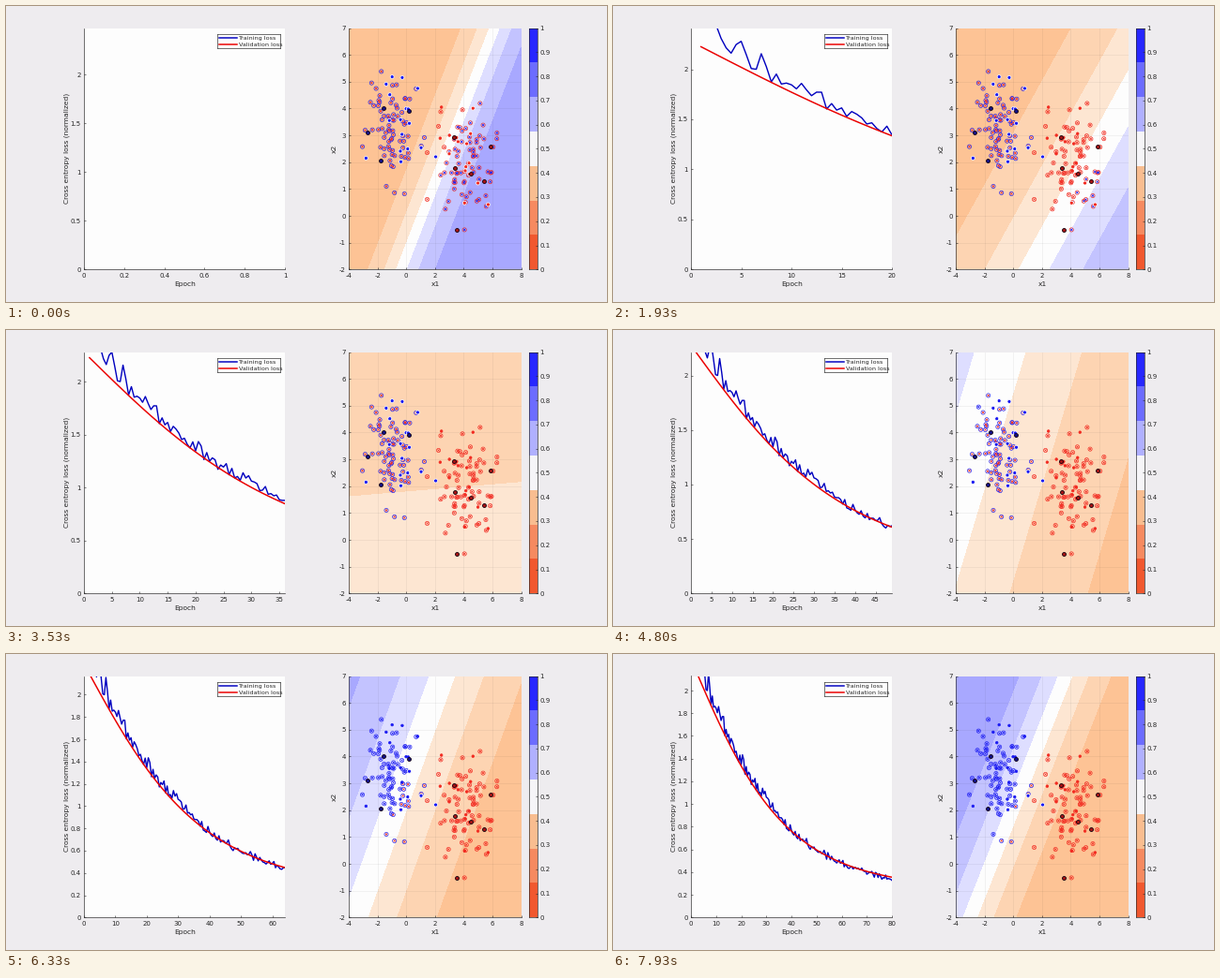
Animation of 640x316 px, one loop 8000 ms. Source, as a matplotlib script:

```python
import numpy as np
import matplotlib.pyplot as plt
from matplotlib.animation import FuncAnimation
from matplotlib.patches import Rectangle

W, H, DPI = 640, 316, 100
EPOCHS, STEP_MS = 80, 100
INK = (0.15, 0.15, 0.15)
BLUE, RED = (0.1, 0.1, 0.95), (0.95, 0.16, 0.12)
LINE_BLUE, LINE_RED = (0, 0, 0.75), (0.92, 0, 0)
TICK_PT, LABEL_PT, LEGEND_PT = 5.0, 5.4, 4.55
BAR = ["#f1582f", "#f68a60", "#f9bd90", "#f6f5f8", "#b0b0ff", "#6c6cff", "#2727ff"]
BANDS = ["#fdc395", "#fdd4b2", "#fde6d2", "#fdfdfd", "#dedeff", "#c3c3ff", "#a8a8ff"]
TOP, BOTTOM = 23.5, 281.3

plt.rcParams["font.family"] = "DejaVu Sans"
plt.rcParams["axes.unicode_minus"] = False
rng = np.random.default_rng(5)


def px(v):
    return v * 72 / DPI


def cloud(mean, spread, count):
    z = np.clip(rng.normal(size=(count, 2)), -2.4, 2.4)
    return np.array(mean) + z * spread


# ---- loss curves: training follows validation with shrinking noise -----
fit = np.polyfit([1, 9, 20, 36, 49, 64, 80],
                 np.log([2.23, 1.81, 1.34, 0.85, 0.605, 0.45, 0.355]), 4)


def valid_loss(x):
    return np.exp(np.polyval(fit, x))


steps = np.arange(1, 2 * EPOCHS + 1) / 2
excess = 0.6 * np.exp(-steps) + 0.17 * np.exp(-steps / 22) - 0.02 * steps / EPOCHS
noise = np.clip(rng.normal(size=len(steps)), -1.6, 1.6)
train = valid_loss(steps) + excess + noise * (0.08 * np.exp(-steps / 28) + 0.009)

# ---- samples: one normal cloud per class ------------------------------
BLUE_MEAN, RED_MEAN = (-0.9, 3.1), (4.1, 2.0)
BLUE_SPREAD, RED_SPREAD = (0.9, 0.95), (1.1, 1.05)
blue_rings = cloud(BLUE_MEAN, BLUE_SPREAD, 72)
red_rings = cloud(RED_MEAN, RED_SPREAD, 72)
blue_dots = np.vstack([cloud((-0.6, 3.5), BLUE_SPREAD, 14),
                       [(0.8, 4.75), (-2.8, 2.15), (2.05, 2.2)]])
red_dots = np.vstack([cloud((3.8, 2.4), (0.9, 0.8), 14), [(2.45, 4.05), (5.7, 0.42)]])
blue_keys = np.array([(-2.7, 3.1), (0.2, 3.9), (-1.55, 4.0), (-1.75, 2.05)])
red_keys = np.array([(3.35, 2.95), (5.85, 2.6), (3.4, 1.78), (4.5, 1.57),
                     (5.4, 1.28), (3.5, -0.53)])

# ---- classifier: logit is linear in the plane and drifts with training -
KEYS = [0, 8, 19, 35, 48, 63, 79]
RIGHTWARD = [9.18, 5.93, 3.22, 0.04, -1.93, -3.78, -6.70]
UPWARD = [-4.96, -3.57, -2.49, -0.67, 0.81, 1.91, 3.70]
OFFSET = [-2.825, -2.016, -1.465, -0.648, -0.321, 0.123, 0.53]
LOSS_TOP = [2.476, 2.464, 2.412, 2.279, 2.215, 2.168, 2.128]
probs = np.arange(1, 7) / 7
LEVELS = np.concatenate([[-99], np.log(probs / (1 - probs)), [99]])


def logit(x, y, i):
    a, b, c = (np.interp(i, KEYS, k) for k in (RIGHTWARD, UPWARD, OFFSET))
    return a * (x + 4) / 12 + b * (y + 2) / 9 + c


# ---- stage -------------------------------------------------------------
fig = plt.figure(figsize=(W / DPI, H / DPI), dpi=DPI, facecolor="#eeecef")


def panel(x0, x1, y0=TOP, y1=BOTTOM, **kw):
    ax = fig.add_axes([x0 / W, 1 - y1 / H, (x1 - x0) / W, (y1 - y0) / H],
                      facecolor="#fdfdfd", **kw)
    for s in ax.spines.values():
        s.set(linewidth=px(0.65), color=INK)
    ax.tick_params(direction="in", length=px(2.2), width=px(0.6), color=INK,
                   labelcolor=INK, labelsize=TICK_PT, pad=px(3.2))
    return ax


def label(x, y, s, size=LABEL_PT, **kw):
    kw = {"ha": "center", "va": "center", **kw}
    fig.text(x / W, 1 - y / H, s, fontsize=size, color=INK, **kw)


left = panel(83, 297)
right = panel(365, 548.6)
for ax in (left, right):
    ax.spines[["top", "right"]].set_visible(False)

label(190.5, 297, "Epoch")
label(64.8, 152, "Cross entropy loss (normalized)", rotation=90)
label(457, 297, "x1")
label(350, 152, "x2", rotation=90)

train_line, = left.plot([], [], color=LINE_BLUE, lw=px(1.4))
valid_line, = left.plot([], [], color=LINE_RED, lw=px(1.5))

# legend
legend = panel(225, 291.5, 29.5, 45, xlim=(225, 291.5), ylim=(45, 29.5),
               xticks=[], yticks=[])
for y, color, name in ((33.6, LINE_BLUE, "Training loss"), (41, LINE_RED, "Validation loss")):
    legend.plot([227, 245.5], [y, y], color=color, lw=px(1.5))
    label(247.5, y, name, LEGEND_PT, ha="left", va="center_baseline")

# colour bar
bar = panel(556.6, 566)
bar.set(xlim=(0, 1), ylim=(0, 1), xticks=[], yticks=np.arange(11) / 10)
bar.yaxis.tick_right()
bar.yaxis.set_major_formatter("{x:g}")
bar.tick_params(pad=px(2.5))
for k, color in enumerate(BAR):
    bar.add_patch(Rectangle((0, k / 7), 1, 1 / 7, color=color, lw=0))

# scatter panel
right.set(xlim=(-4, 8), ylim=(-2, 7), xticks=range(-4, 9, 2), yticks=range(-2, 8))
for v in range(-2, 8, 2):
    right.axvline(v, color=INK, alpha=0.08, lw=px(0.7), zorder=1)
for v in range(-1, 7):
    right.axhline(v, color=INK, alpha=0.08, lw=px(0.7), zorder=1)


def scatter(pts, size, lw, **kw):
    return right.scatter(*pts.T, s=px(size) ** 2, linewidths=px(lw), **kw)


crosses, dots = [], []
for rings, solid, keys, color, rim, own in (
        (blue_rings, blue_dots, blue_keys, BLUE, "#101090", True),
        (red_rings, red_dots, red_keys, RED, "#b01414", False)):
    scatter(rings, 4.2, 0.65, facecolors="none", edgecolors=[color], zorder=3)
    crosses.append((scatter(rings, 2.4, 0.6, marker="x", color=color, zorder=4), rings))
    dots.append((scatter(solid, 3, 0.7, color=color, zorder=5), solid, color, own))
    scatter(keys, 3.9, 0.9, facecolors=rim, edgecolors="#140410", zorder=6)

gx, gy = np.meshgrid((-4, 8), (-2, 7))
state = {"bands": None}


def ticks(span, most):
    # finest 1-2-5 step that gives no more than `most` ticks
    for step in (m * mag for mag in (0.1, 1, 10) for m in (1, 2, 5)):
        count = int(span / step + 1e-9) + 1
        if count <= most:
            break
    marks = np.arange(count) * step
    return marks, [f"{t:g}" for t in marks]


def draw(i):
    n = i + 1
    top = np.interp(i, KEYS, LOSS_TOP)
    left.set(xlim=(0, n), ylim=(0, top))
    left.set_xticks(*ticks(n, 10))
    left.set_yticks(*ticks(top, 11))
    train_line.set_data(steps[:2 * n], train[:2 * n])
    epochs = np.arange(1, n + 1)
    valid_line.set_data(epochs, valid_loss(epochs))

    if state["bands"] is not None:
        state["bands"].remove()
    state["bands"] = right.contourf(gx, gy, logit(gx, gy, i), levels=LEVELS,
                                    colors=BANDS, zorder=0)
    for marks, pts in crosses:
        marks.set_color([BLUE if g else RED for g in logit(*pts.T, i) > 0])
    for marks, pts, color, own in dots:
        right_guess = (logit(*pts.T, i) > 0) == own
        marks.set_edgecolor([color if ok else "white" for ok in right_guess])
        marks.set_sizes(px(np.where(right_guess, 2.6, 4)) ** 2)
    return []


anim = FuncAnimation(fig, draw, frames=EPOCHS, interval=STEP_MS, repeat=True,
                     repeat_delay=0, blit=False)
plt.show()
```
